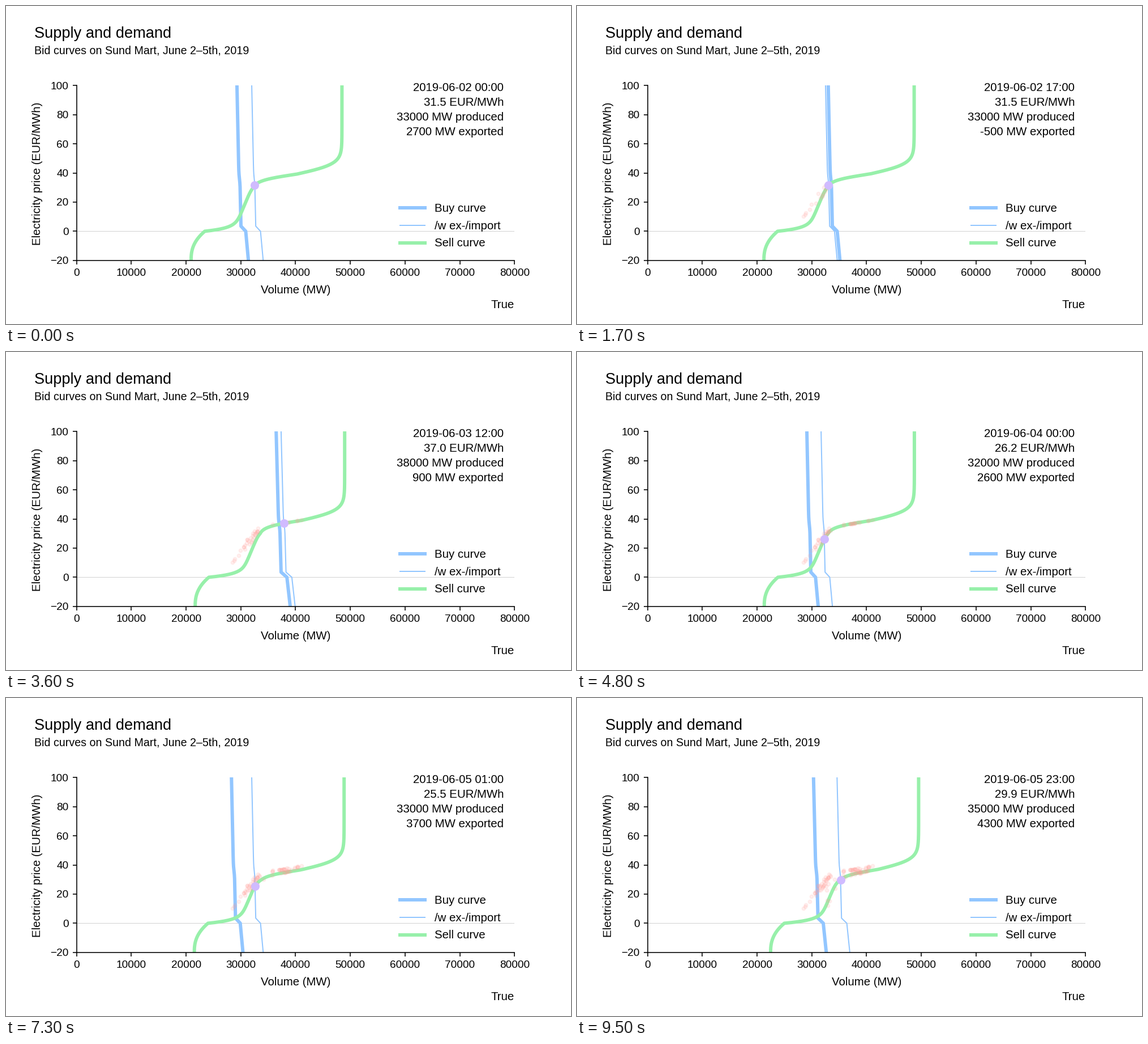
Write a matplotlib script that moves like this. It is 998 by 561 pixels and loops after 9.6 s.

```python
import numpy as np
import matplotlib.pyplot as plt
from matplotlib.animation import FuncAnimation
from matplotlib.lines import Line2D

W, H, DPI = 998, 561, 144
HOURS = 96
BLUE, GREEN, PINK, PURPLE = "#92C6FF", "#97F0AA", "#FF9F9A", "#D0BBFF"
PRICES = np.linspace(-20, 100, 481)

plt.rcParams["font.family"] = "Liberation Sans"

# Turning points of the market:
# hour, volume (GW), price, export (GW), price at the middle of the flat part
TURNS = np.array([
    (0, 32.55, 31.5, 2.7, 39.2), (5, 28.45, 10.3, 1.2, 39.3),
    (10, 31.9, 24, .3, 39.3), (17, 33.07, 31.5, -.5, 39.3),
    (27, 30.5, 20.6, 1.8, 39.3), (33, 41.1, 39.3, 1.6, 39.2),
    (36, 37.88, 37, .9, 39), (45, 37, 36.6, 1, 38.9),
    (48, 32.29, 26.2, 2.6, 38.8), (51, 30.9, 21.2, 2.8, 38.8),
    (57, 40.5, 38.5, 2.2, 38.9), (63, 37.9, 34.6, 1.6, 37.8),
    (67, 38.9, 35.7, 1.5, 37.9), (73, 32.6, 25.5, 3.7, 36.6),
    (76, 32.9, 12.2, 3.9, 36.7), (83, 40.2, 36, 2.6, 37.3),
    (89, 38.8, 34.4, 2.8, 36.7), (95, 35.25, 29.9, 4.3, 36.9),
])


def ease(t, times, values):
    """Cosine easing between turning points."""
    i = np.clip(np.searchsorted(times, t, "right") - 1, 0, len(times) - 2)
    u = (t - times[i]) / (times[i + 1] - times[i])
    return values[i] + (values[i + 1] - values[i]) * (1 - np.cos(np.pi * u)) / 2


def sell_parts(p, mid):
    """Volume offered at price p, and its gain per GW of extra supply."""
    low = 2.5 * np.clip((p + 20) / 20, 0, 1) ** 2.5
    cheap = 1 - np.exp(-np.maximum(p, 0) / 2.2)
    flat = 1 / (1 + np.exp((mid - p) / np.where(p < mid, 2.3, 3.5)))
    base = 20.8 + low + 5.2 * cheap + .11 * np.clip(p, 0, 30) + 16.6 * flat
    return base, .6 + .4 * cheap - .6 * flat


def buy_curve(p):
    """Extra demand (GW) as the price falls from 100 to p."""
    return (.006 * (100 - p) + .2 / (1 + np.exp((p - 36) / 2))
            + .9 * np.clip(1 - p / 3.5, 0, 1) + .02 * np.maximum(-p, 0))


turn_hour, turn_volume, turn_price, turn_export, turn_mid = TURNS.T
base, gain = sell_parts(turn_price, turn_mid)
turn_supply = (turn_volume - base) / gain

hours = np.arange(HOURS)
volume, export, mid, supply = (
    ease(hours, turn_hour, v) for v in (turn_volume, turn_export, turn_mid, turn_supply))


def sell_curve(n):
    base, gain = sell_parts(PRICES, mid[n])
    return base + supply[n] * gain


price = np.array([np.interp(volume[n], sell_curve(n), PRICES) for n in hours])

fig = plt.figure(figsize=(W / DPI, H / DPI), dpi=DPI, facecolor="white")


def label(x, y, s="", size=10.2, **kw):
    return fig.text(x / W, 1 - y / H, s, size=size, color="black", **kw)


ax = fig.add_axes([.125, .2, .775, .55])
ax.set(xlim=(0, 80000), ylim=(-20, 100))
ax.set_xticks(range(0, 80001, 10000))
ax.set_yticks(range(-20, 101, 20))
ax.tick_params(labelsize=9.5)
ax.spines[["top", "right"]].set_visible(False)
ax.axhline(0, color="#d3d3d3", lw=.5, zorder=1)

label(50, 56.5, "Supply and demand", 13.65)
label(50, 84.5, "Bid curves on Sund Mart, June 2–5th, 2019", 9.8)
label(511.5, 507, "Volume (MW)", ha="center")
label(61, 295.5, "Electricity price (EUR/MWh)", ha="center", va="baseline",
      rotation=90, rotation_mode="anchor")
label(898, 533, "True", ha="right")

for y, name, color, lw in [(356, "Buy curve", BLUE, 3),
                           (386.5, "/w ex-/import", BLUE, 1),
                           (417.5, "Sell curve", GREEN, 3)]:
    fig.add_artist(Line2D([695.5 / W, 739.5 / W], [1 - y / H] * 2, color=color, lw=lw,
                          solid_capstyle="projecting"))
    label(757, y + 7, name)

buy, = ax.plot([], [], color=BLUE, lw=3)
traded, = ax.plot([], [], color=BLUE, lw=1)
sell, = ax.plot([], [], color=GREEN, lw=3)
trail, = ax.plot([], [], "o", color=PINK, ms=3, mew=1, alpha=.14, zorder=3)
dot, = ax.plot([], [], "o", color=PURPLE, ms=6.5, mew=1, zorder=4)
info = [label(879, 150.5 + 25.7 * i, ha="right") for i in range(4)]


def update(n):
    scale = 1 + .04 * (volume[n] - 34)
    demand = volume[n] + scale * (buy_curve(PRICES) - buy_curve(price[n]))
    buy.set_data((demand - export[n]) * 1000, PRICES)
    traded.set_data(demand * 1000, PRICES)
    sell.set_data(sell_curve(n) * 1000, PRICES)
    trail.set_data(volume[:n] * 1000, price[:n])
    dot.set_data([volume[n] * 1000], [price[n]])
    lines = (f"2019-06-{2 + n // 24:02d} {n % 24:02d}:00",
             f"{price[n]:.1f} EUR/MWh",
             f"{round(volume[n]) * 1000} MW produced",
             f"{round(export[n] * 10) * 100} MW exported")
    for text, line in zip(info, lines):
        text.set_text(line)
    return buy, traded, sell, trail, dot, *info


anim = FuncAnimation(fig, update, frames=HOURS, interval=100, repeat=True, repeat_delay=0)
plt.show()
```
